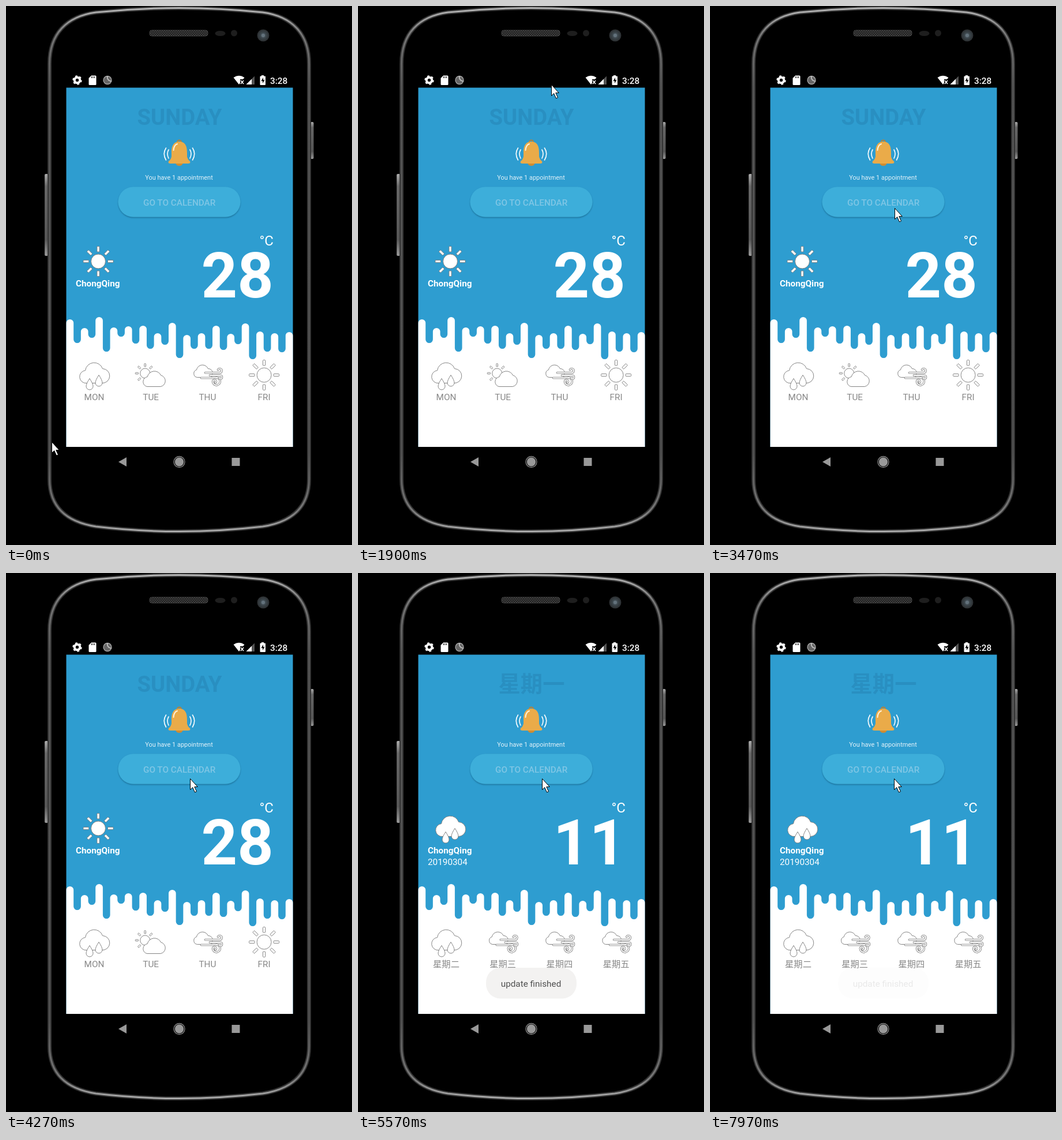
An HTML page for the animation above (8 s loop, 600 by 934 pixels).

```html
<!DOCTYPE html>
<html lang="en">
<head>
<meta charset="utf-8">
<title>Weather phone</title>
<style>
  html, body { margin: 0; height: 100%; overflow: hidden; background: #000; }
  svg { display: block; width: 100vw; height: 100vh; }
  text { font-family: Roboto, "Noto Sans CJK SC", "Noto Sans CJK", sans-serif; font-size: 15.3px; }
  .mid { text-anchor: middle; }
  .white { fill: #fff; }
  .day { fill: #888; }
  .line { fill: #fff; stroke: #777; stroke-width: .9; stroke-linejoin: round; }
  .dark .line { stroke: #173f55; stroke-width: 1; }
  .gust { fill: none; stroke-linecap: round; }
</style>
</head>
<body>
<svg viewBox="0 0 600 934">
  <defs>
    <linearGradient id="rim" x2="0" y2="1">
      <stop stop-color="#b5b5b5"/><stop offset=".05" stop-color="#777"/>
      <stop offset=".15" stop-color="#555"/><stop offset=".85" stop-color="#505050"/>
      <stop offset=".96" stop-color="#777"/><stop offset="1" stop-color="#aaa"/>
    </linearGradient>
    <linearGradient id="key" x2="0" y2="1">
      <stop stop-color="#aaa"/><stop offset=".15" stop-color="#666"/>
      <stop offset=".8" stop-color="#555"/><stop offset="1" stop-color="#999"/>
    </linearGradient>
    <radialGradient id="lens">
      <stop stop-color="#64747f"/><stop offset=".45" stop-color="#3c464c"/><stop offset="1" stop-color="#2b2e30"/>
    </radialGradient>
    <pattern id="mesh" width="4" height="4" patternUnits="userSpaceOnUse">
      <rect width="4" height="4" fill="#1b1b1b"/>
      <circle cx="1" cy="1" r=".9" fill="#555"/><circle cx="3" cy="3" r=".9" fill="#555"/>
    </pattern>
    <filter id="shadow" x="-10%" y="-30%" width="120%" height="170%">
      <feDropShadow id="drop" dx="0" dy="1.5" stdDeviation="1.3" flood-color="#053a58" flood-opacity=".45"/>
    </filter>

    <path id="body" d="M75.500 100C75.500 48 105 18 156 11Q300 -4 445 11C496 18 525.500 48 525.500 100V820C525.500 868 496 894 445 902Q300 919 156 902C105 894 75.500 868 75.500 820Z"/>

    <g id="rain" class="line">
      <path d="M13 40A11 11 0 0 1 10.500 18A15.500 15.500 0 0 1 40.500 15A12.500 12.500 0 0 1 40 40Z"/>
      <path id="raindrop" d="M18 32Q12 41 12 45.500A6 6 0 0 0 24 45.500Q24 41 18 32Z"/>
      <use href="#raindrop" x="16" y="-6"/>
    </g>
    <g id="partly">
      <g id="smallSun" class="line"></g>
      <path class="line" d="M19 46A8.700 8.700 0 0 1 20 29A12.500 12.500 0 0 1 43.500 26.500A10 10 0 0 1 43 46Z"/>
    </g>
    <g id="wind">
      <path class="line" d="M33 30H8A6.700 6.700 0 0 1 7 17A10.500 10.500 0 0 1 27 15A7.500 7.500 0 0 1 35 22Z"/>
      <g id="gusts"></g>
    </g>
    <g id="sun" class="line"></g>
  </defs>

  <rect width="600" height="934"/>

  <!-- phone body -->
  <rect x="67" y="291" width="6" height="142" rx="2" fill="url(#key)"/>
  <rect x="528" y="201" width="5.500" height="64" rx="2" fill="url(#key)"/>
  <use href="#body" stroke="#343434" stroke-width="7"/>
  <use href="#body" fill="none" stroke="url(#rim)" stroke-width="3"/>
  <rect x="249" y="42" width="101" height="10" rx="4" fill="url(#mesh)" stroke="#444"/>
  <ellipse cx="371.500" cy="47.500" rx="9" ry="4.500" fill="#1e1e1e"/>
  <circle cx="395.500" cy="47" r="5.500" fill="#1e1e1e"/>
  <circle cx="446" cy="51" r="10.500" fill="url(#lens)"/>
  <circle cx="446" cy="51" r="3" fill="#63727c"/>

  <!-- status bar -->
  <circle cx="123.500" cy="128.500" r="4.700" fill="none" stroke="#fff" stroke-width="4"/>
  <circle cx="123.500" cy="128.500" r="7.200" fill="none" stroke="#fff" stroke-width="2" stroke-dasharray="3.770"/>
  <path class="white" d="M148 120.500H155Q156.500 120.500 156.500 122V135.500Q156.500 137 155 137H145Q143.500 137 143.500 135.500V125Z"/>
  <path d="M148.500 122v3m2.500-3v3m2.500-3v3" stroke="#000"/>
  <circle cx="176" cy="128.500" r="7" fill="#666" stroke="#aaa" stroke-width="1.300"/>
  <path d="M176 121.500a7 7 0 0 0 7 9" fill="none" stroke="#ccc" stroke-width="1.500"/>
  <path class="white" d="M394.500 124Q404 117.500 413.500 124L411 127H406V133.500L404 136Z"/>
  <path d="M407 129l5 6m0-6l-5 6" stroke="#fff" stroke-width="1.600"/>
  <path d="M416.500 136L431 121.500V136Z" fill="#555"/>
  <path class="white" d="M416.500 136L426 126.500V136Z"/>
  <path class="white" d="M443 121.500V120h4v1.500h2q1 0 1 1V136q0 1-1 1h-7.500q-1 0-1-1V122.500q0-1 1-1Z"/>
  <path d="M446 124l-3.500 6h2.500v4l3.500-6H446Z"/>
  <text class="white" x="458" y="134.500" font-weight="500">3:28</text>

  <!-- screen -->
  <rect x="104.500" y="141.500" width="393" height="622.500" fill="#2e9dd0"/>
  <path id="wave" fill="#fff"/>
  <text id="title" class="mid" x="301" y="206" font-weight="700" style="font-size:38.3px" fill="#298fc1"></text>

  <g fill="none" stroke="#fff" stroke-width="1.600" stroke-linecap="round">
    <path d="M282 249Q278 256 282 264M277.500 246Q271 256 277.500 267M319 249Q323 256 319 264M323.500 246Q330 256 323.500 267"/>
  </g>
  <circle cx="300.500" cy="236" r="3.500" fill="none" stroke="#b98236" stroke-width="2"/>
  <ellipse cx="300.500" cy="272.500" rx="6" ry="4.500" fill="#cf8c32"/>
  <path d="M300.500 235C289 235 287 245 287 254V261Q286 266 282 269Q280.500 273 285 273H316Q320.500 273 319 269Q315 266 314 261V254C314 245 312 235 300.500 235Z" fill="#eaab49"/>
  <path d="M290.500 250Q291 241 297 239" fill="none" stroke="#fff1d6" stroke-width="2" stroke-linecap="round"/>

  <text class="mid" x="300" y="300.800" style="font-size:10.94px" fill="#e3f2f9">You have 1 appointment</text>
  <rect id="button" x="194.500" y="313.500" width="212" height="52" rx="26" filter="url(#shadow)"/>
  <text id="buttonText" class="mid" x="300.700" y="345.500" font-weight="500">GO TO CALENDAR</text>

  <text class="white" x="464" y="414.500" text-anchor="end" style="font-size:24px">°C</text>
  <text id="degrees" class="white" x="464" y="505" text-anchor="end" font-weight="700" style="font-size:109.4px"></text>
  <use id="today" class="dark" x="134" y="416.500"/>
  <text class="white" x="121" y="486" font-weight="700">ChongQing</text>
  <text id="date" class="white" x="121" y="506.300"></text>
  <g id="forecast"></g>

  <g id="toast">
    <rect x="222" y="684" width="157" height="53.500" rx="25" fill="#f1f0ef"/>
    <text class="mid" x="300" y="717" fill="#333">update finished</text>
  </g>

  <!-- navigation bar -->
  <path d="M195 790L209 782V798Z" fill="#999"/>
  <circle cx="300.500" cy="790" r="9.500" fill="none" stroke="#888" stroke-width="1.300"/>
  <circle cx="300.500" cy="790" r="7.700" fill="#999"/>
  <rect x="391.500" y="783" width="14" height="14" fill="#999"/>

  <path id="cursor" d="M.5 .5V19.500L4.700 15.500L8.500 24L11.500 22.700L7.800 14.500H13.300Z" fill="#fff" stroke="#000" stroke-linejoin="round"/>
</svg>
<script>
const LOOP = 8000;
const el = id => document.getElementById(id);
const clamp = v => Math.min(1, Math.max(0, v));
const progress = (t, from, to) => clamp((t - from) / (to - from));
const ease = p => p * p * (3 - 2 * p);

function sunMarkup(cx, cy, r, inner, outer, width, angles) {
  const rays = angles.map(a =>
    `<rect x="${cx - width / 2}" y="${cy - outer}" width="${width}" height="${outer - inner}" rx="1" transform="rotate(${a} ${cx} ${cy})"/>`);
  return `<circle cx="${cx}" cy="${cy}" r="${r}"/>` + rays.join('');
}
const eighths = [0, 1, 2, 3, 4, 5, 6, 7].map(i => i * 45);
el('sun').innerHTML = sunMarkup(26, 26, 12.5, 16.5, 26, 4.2, eighths);
el('smallSun').innerHTML = sunMarkup(16, 23, 8.5, 11.5, 17, 2.6, eighths.filter(a => a !== 135));

// Each gust is a grey stroke with a thinner white one on top.
const gusts = [
  'M22 22H47A3.500 3.500 0 1 0 44 17',
  'M15 31H39A6.500 6.500 0 1 1 35 37Q36 33 40 35Q43 38 39 39',
  'M30 26.500H48Q52 27 51 31Q49 34 46 31'
];
el('gusts').innerHTML = gusts.map(d =>
  [['#777', 3.4], ['#fff', 1.8]].map(([color, w]) =>
    `<path class="gust" d="${d}" stroke="${color}" stroke-width="${w}"/>`).join('')).join('');

// Alternating tops of the white bars and bottoms of the blue drips.
const edge = [543, 584, 558, 575, 539, 599, 557, 573, 555, 585, 554, 594, 567, 587, 549, 610,
  570, 594, 567, 594, 554, 596, 568, 586, 550, 612, 564, 599, 567, 600, 565];
const barWidth = 393 / edge.length, radius = barWidth / 2;
el('wave').setAttribute('d', edge.reduce((d, y, i) => {
  const up = i % 2 === 0;
  return `${d}V${y + (up ? radius : -radius)}a${radius} ${radius} 0 0 ${up ? 1 : 0} ${barWidth} 0`;
}, 'M104.5 764') + 'V764Z');

const screens = [
  { title: 'SUNDAY', degrees: '28', today: 'sun', date: '',
    days: [['rain', 'MON'], ['partly', 'TUE'], ['wind', 'THU'], ['sun', 'FRI']] },
  { title: '星期一', degrees: '11', today: 'rain', date: '20190304',
    days: [['rain', '星期二'], ['wind', '星期三'], ['wind', '星期四'], ['wind', '星期五']] }
];
let shown;
function show(screen) {
  if (shown === screen) return;
  shown = screen;
  for (const id of ['title', 'degrees', 'date']) el(id).textContent = screen[id];
  el('today').setAttribute('href', '#' + screen.today);
  el('forecast').innerHTML = screen.days.map(([icon, name], i) => {
    const x = 153 + i * 98.2;
    return `<use href="#${icon}" x="${x - 26}" y="613.500"/><text class="mid day" x="${x}" y="682.500">${name}</text>`;
  }).join('');
}

// Cursor moves: start, end, target x, target y.
const moves = [
  [30, 460, 383, 256], [800, 1330, 335, 136], [2030, 2700, 424, 517],
  [2860, 3400, 320, 350], [3700, 3900, 319, 356]
];
function cursorAt(t) {
  let x = 79, y = 755;
  for (const [from, to, tx, ty] of moves) {
    const p = ease(progress(t, from, to));
    x += (tx - x) * p;
    y += (ty - y) * p;
  }
  return `translate(${x} ${y})`;
}

const mix = (a, b, p) => `rgb(${a.map((v, i) => v + (b[i] - v) * p)})`;

function draw() {
  const t = performance.now() % LOOP;
  show(screens[t < 5400 ? 0 : 1]);
  el('cursor').setAttribute('transform', cursorAt(t));

  const press = progress(t, 4450, 4600) - progress(t, 5020, 5170);
  el('button').setAttribute('fill', mix([60, 174, 218], [46, 152, 202], press));
  el('buttonText').setAttribute('fill', mix([127, 198, 229], [122, 184, 216], press));
  el('drop').setAttribute('dy', 1.5 + press * 1.5);
  el('drop').setAttribute('stdDeviation', 1.3 + press * 1.7);

  const toast = progress(t, 5400, 5600) - .9 * progress(t, 7080, 7470);
  el('toast').setAttribute('opacity', toast);
  requestAnimationFrame(draw);
}
draw();
</script>
</body>
</html>
```
